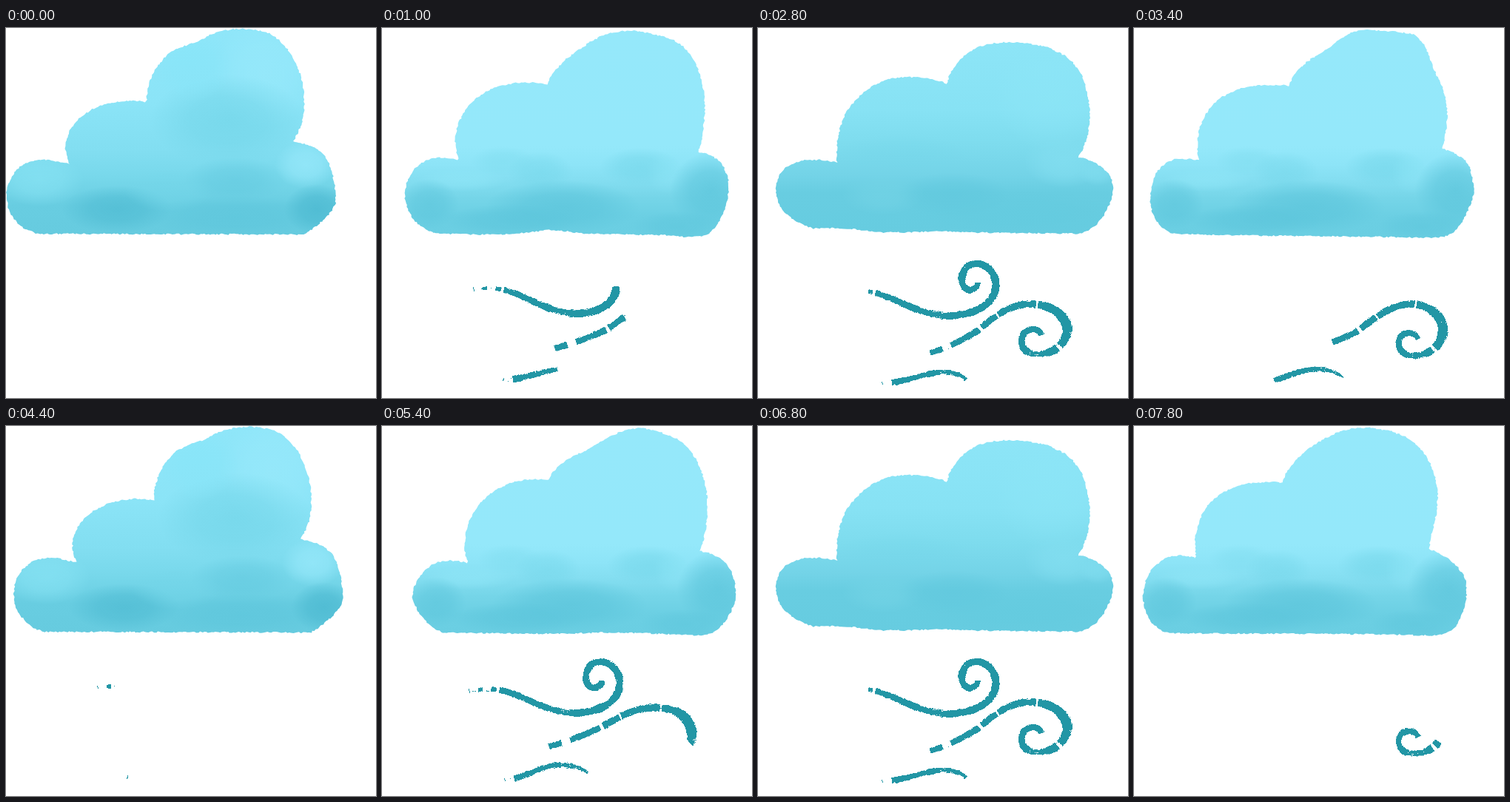
An HTML page with a canvas that plays this animation: 500x500 px, repeating every 8010 ms.

```html
<!DOCTYPE html>
<html lang="en">
<head>
<meta charset="utf-8">
<title>Windy cloud</title>
<style>
  html, body { margin: 0; width: 100%; height: 100%; overflow: hidden; background: #fff; }
  canvas { display: block; width: 100vw; height: 100vh; }
</style>
</head>
<body>
<canvas id="stage" width="500" height="500"></canvas>
<script>
const LOOP = 8010, STEP = 200, CYCLE = 20;
const ctx = document.getElementById('stage').getContext('2d');

function seeded(seed) {
  let s = seed * 2654435761 >>> 0;
  return () => {
    s = s + 0x6D2B79F5 >>> 0;
    let t = Math.imul(s ^ s >>> 15, 1 | s);
    t = t + Math.imul(t ^ t >>> 7, 61 | t) ^ t;
    return ((t ^ t >>> 14) >>> 0) / 4294967296;
  };
}

// Points along an SVG path, evenly spaced
function sample(d, gap) {
  const path = document.createElementNS('http://www.w3.org/2000/svg', 'path');
  path.setAttribute('d', d);
  const len = path.getTotalLength(), pts = [];
  for (let s = 0; s <= len; s += gap) {
    const p = path.getPointAtLength(s);
    pts.push([p.x, p.y]);
  }
  return pts;
}

// The cloud drifts right for half a cycle, then back
const drift = k => 4.8 * Math.min(k, CYCLE - k);

// Watercolour washes: vertical stops, then soft spots [x, y, rx, ry, rgb, alpha]
const LIGHT = '152,233,251', MID = '116,214,233', DARK = '92,197,219', DEEP = '80,188,211';
const washes = {
  tall: {
    stops: [[0, '#8fe6f9'], [100, '#8be4f7'], [165, '#82def1'], [200, '#78d8eb'], [240, '#68cde1'], [280, '#66cbdf']],
    spots: [
      [350, 60, 70, 75, LIGHT, .7], [300, 125, 105, 62, MID, .75], [250, 50, 55, 50, '136,229,248', .8],
      [405, 185, 42, 32, LIGHT, .75], [45, 205, 60, 36, '134,226,243', .7], [150, 245, 75, 32, DEEP, .75],
      [310, 205, 70, 30, DARK, .45], [310, 255, 120, 28, DARK, .6], [420, 245, 44, 34, DEEP, .95],
      [220, 220, 60, 28, MID, .5]
    ]
  },
  pale: {
    stops: [[0, '#95e8fa'], [160, '#94e8fa'], [185, '#8de4f7'], [205, '#84def1'], [230, '#75d5e8'], [255, '#6bcfe3'], [285, '#6acee2']],
    spots: [
      [140, 180, 45, 20, '125,219,237', .45], [190, 195, 45, 28, MID, .5], [325, 188, 55, 26, MID, .6],
      [85, 205, 60, 16, '143,230,247', .6], [220, 242, 105, 36, DARK, .75], [150, 260, 90, 22, DARK, .65],
      [40, 238, 40, 34, DARK, .6], [362, 195, 28, 30, '140,229,246', .4],
      [420, 220, 55, 52, DARK, .75], [375, 268, 60, 20, DARK, .5]
    ]
  },
  even: {
    stops: [[15, '#8de5f7'], [110, '#87e2f4'], [155, '#7edcee'], [200, '#73d3e7'], [222, '#68cde1'], [280, '#66cce0']],
    spots: [
      [365, 90, 75, 75, '141,230,247', .5], [385, 180, 55, 36, '130,222,240', .8], [165, 172, 90, 28, MID, .35],
      [140, 225, 55, 28, '116,212,230', .6], [235, 225, 75, 30, DARK, .4], [320, 250, 150, 30, '98,202,222', .5],
      [430, 195, 26, 18, '128,221,239', .7]
    ]
  }
};

// Each drawing: wash, the step it was posed at, outline
const clouds = [
  ['tall', 0, 'M42 278C18 272 0 252 1 225C2 198 22 178 50 178C64 179 74 182 86 184C76 166 80 144 92 130C112 104 152 94 190 100C190 72 204 42 232 27C248 22 258 20 274 10C296 0 326 -2 355 7C384 22 404 60 403 105C403 125 396 140 388 153C412 158 432 164 439 190C444 206 446 222 445 238C436 256 420 268 403 279Z'],
  ['pale', 5, 'M70 277C46 268 31 250 31 225C32 198 50 176 76 175C86 175 94 176 104 178C95 158 98 130 115 108C136 80 176 68 223 76C232 52 262 30 290 14C320 0 345 2 372 10C398 15 410 25 420 42C440 75 440 120 428 168C448 170 463 182 468 205C470 230 462 258 444 276C430 285 412 283 385 280C330 279 290 279 265 277C245 274 230 272 215 274C180 279 130 281 70 277Z'],
  ['pale', 7, 'M82 279C62 272 42 246 41 229C46 200 68 180 92 182C102 182 108 183 116 185C107 160 113 128 130 108C152 80 185 68 226 73C230 55 250 45 275 33C300 20 320 3 347 3C368 4 376 8 382 11C400 16 414 26 424 45C444 80 444 125 430 169C452 173 468 182 475 204C480 222 478 240 470 254C460 272 450 281 430 283C390 282 350 279 300 279C230 282 150 280 82 279Z'],
  ['even', 10, 'M100 274C70 270 44 252 43 229C44 205 70 185 115 182C124 181 130 182 137 185C128 165 128 140 140 115C160 80 185 65 220 66C240 67 258 70 273 77C278 50 290 30 312 23C345 17 380 18 410 27C440 38 462 72 468 105C470 135 464 160 454 178C475 182 492 195 498 215C500 240 485 262 448 278C400 279 300 279 200 277C160 276 130 276 100 274Z'],
  ['even', 14, 'M75 271C45 262 25 245 24 217C26 192 44 178 78 178C90 178 98 180 107 182C104 150 112 115 135 95C160 68 190 64 220 67C234 68 244 71 255 75C262 48 285 26 315 21C345 17 380 20 405 32C425 42 440 62 443 80C452 115 450 150 432 175C455 178 478 192 480 215C478 240 465 268 436 278C370 277 310 277 245 275C200 276 165 277 150 275C130 270 105 270 75 271Z'],
  ['pale', 17, 'M52 278C34 270 23 256 22 232C22 205 32 182 58 177C70 176 78 178 88 178C82 155 87 130 103 108C125 80 165 74 210 78C216 56 236 43 262 28C290 4 302 2 325 3C345 4 368 6 379 9C396 20 400 45 412 70C428 100 424 135 417 163C438 170 452 178 455 194C460 215 460 222 456 235C446 258 440 275 420 282C400 285 360 282 300 282C200 281 120 280 52 278Z'],
  ['pale', 19, 'M50 280C28 278 13 258 12 228C14 200 32 176 60 175C68 175 76 177 84 178C80 155 84 130 98 110C120 80 155 74 200 76C208 52 232 30 260 16C285 2 305 0 330 4C360 8 385 20 400 50C414 78 412 110 404 138C401 150 400 158 399 166C420 174 440 188 448 208C452 228 447 250 438 265C430 280 420 284 395 283C300 280 150 281 50 280Z']
].map(([wash, pose, d]) => ({ wash: washes[wash], pose, pts: sample(d, 2.5) }));

// First step of each drawing within a cycle
const cloudFrom = [0, 5, 7, 10, 13, 15, 18];

function drawCloud(k) {
  const i = cloudFrom.filter(from => from <= k).length - 1;
  const { wash, pose, pts } = clouds[i];
  const rnd = seeded(k + 11), shift = drift(k) - drift(pose);
  ctx.save();
  ctx.beginPath();
  for (const [x, y] of pts) ctx.lineTo(x + shift + rnd() * 2 - 1, y + rnd() * 2 - 1);
  ctx.closePath();
  ctx.clip();
  const base = ctx.createLinearGradient(0, 0, 0, 290);
  for (const [y, color] of wash.stops) base.addColorStop(y / 290, color);
  ctx.fillStyle = base;
  ctx.fillRect(0, 0, 500, 300);
  ctx.translate(drift(k), 0);
  for (const [x, y, rx, ry, rgb, alpha] of wash.spots) {
    ctx.save();
    ctx.translate(x, y);
    ctx.scale(rx, ry);
    const g = ctx.createRadialGradient(0, 0, 0, 0, 0, 1);
    g.addColorStop(0, `rgba(${rgb},${alpha})`);
    g.addColorStop(.5, `rgba(${rgb},${alpha * .75})`);
    g.addColorStop(1, `rgba(${rgb},0)`);
    ctx.fillStyle = g;
    ctx.fillRect(-1, -1, 2, 2);
    ctx.restore();
  }
  ctx.restore();
}

// Gusts: paths by first step, brush width along the line, gaps in px,
// dryness along the line, times (ms) of drawing in and wiping out
const gusts = [
  {
    paths: [
      [0, 'M124 353C142 351 156 351 172 356C195 362 222 384 262 386C290 386 312 374 316 355C318 325 292 315 281 322C270 334 276 352 286 354C292 353 296 349 297 344'],
      [7, 'M118 358C136 356 150 354 165 358C195 366 220 386 260 388C305 386 324 366 321 342C316 320 296 314 283 322C270 336 276 354 286 354C294 353 297 349 297 344'],
      [8, 'M118 358C136 355 146 354 160 361C190 369 215 384 258 386C300 383 322 362 316 340C311 318 288 315 277 323C270 334 274 352 286 351C291 351 294 348 295 344'],
      [13, 'M118 358C136 356 150 354 165 360C195 369 220 389 260 389C305 386 324 366 321 342C316 320 296 314 283 322C270 336 276 354 286 354C294 353 297 349 297 344']
    ],
    width: u => u < .12 ? 5 : 6 + 3.5 * Math.sin(Math.PI * Math.min(1, u * .85)),
    gaps: [[0, 12], [18, 30], [37, 41]],
    dry: u => u > .3 && u < .42 ? .5 : 0,
    draw: [330, 1330], wipe: [2740, 3390]
  },
  {
    paths: [
      [0, 'M234 433C258 426 278 419 296 411C308 406 318 397 327 391C350 378 360 379 375 380C405 383 420 398 419 424C412 432 395 438 375 438C356 436 352 420 360 409C368 402 380 402 383 412'],
      [7, 'M226 433C250 426 275 418 300 405C325 390 350 378 375 381C405 383 420 398 419 424C412 432 395 438 375 438C356 436 352 420 360 409C368 402 380 402 383 412'],
      [8, 'M233 438C255 432 275 420 297 406C318 388 340 370 368 370C400 370 420 390 418 408C412 430 395 438 375 438C356 436 352 420 360 409C368 402 380 402 383 412'],
      [13, 'M233 439C255 433 275 422 297 409C318 391 340 373 368 373C400 373 420 393 418 411C412 433 395 441 375 441C356 439 352 423 360 412C368 405 380 405 383 415'],
      [15, 'M235 437C255 429 275 423 298 412C322 396 345 372 378 373C402 375 421 393 417 414C412 434 395 443 376 443C358 442 354 426 361 416C369 410 380 411 384 420']
    ],
    width: u => 7.5 + 4 * Math.exp(-(((u - .62) / .1) ** 2)) + 1.5 * Math.sin(Math.PI * u),
    gaps: [[17, 30], [73, 78], [103, 106], [160, 163], [243, 248]],
    dry: u => u > .76 && u < .83 ? .6 : 0,
    draw: [660, 1750], wipe: [3330, 4010]
  },
  {
    paths: [
      [0, 'M164 475C185 476 205 467 238 461C260 458 272 464 280 470'],
      [7, 'M166 478C190 478 215 458 240 458C258 458 270 462 278 469'],
      [8, 'M167 478C190 482 215 472 240 471C262 471 272 476 281 479'],
      [13, 'M168 480C195 480 225 466 250 465C268 465 276 470 281 475'],
      [15, 'M168 481C195 478 220 462 245 461C266 461 276 467 283 472']
    ],
    width: u => u < .1 ? 5 : 8.5 - 3 * u,
    gaps: [[0, 13]],
    dry: u => u > .68 ? .7 : .15,
    draw: [340, 1390], wipe: [3310, 3800]
  }
];
for (const g of gusts) g.paths = g.paths.map(([from, d]) => [from, sample(d, .7)]);

const ramp = (t, [a, b]) => Math.max(0, Math.min(1, (t - a) / (b - a)));

// Dry brush: each bristle carries its own slowly changing load of paint
function drawGust(g, k, seed) {
  const t = k * STEP, head = ramp(t, g.draw), tail = ramp(t, g.wipe);
  if (head <= tail) return;
  const pts = g.paths.filter(([from]) => from <= k).pop()[1];
  const rnd = seeded(seed * 100 + k), n = pts.length - 1;
  const bristles = Array(25).fill(0);
  let rough = 0;
  ctx.fillStyle = '#2296a5';
  for (let i = 0; i <= n; i++) {
    const u = i / n, s = i * .7;
    const [x, y] = pts[i];
    const p = pts[Math.max(0, i - 1)], q = pts[Math.min(n, i + 1)];
    const len = Math.hypot(q[0] - p[0], q[1] - p[1]) || 1;
    const nx = (p[1] - q[1]) / len, ny = (q[0] - p[0]) / len;
    rough = rough * .85 + (rnd() - .5) * .6;
    const half = g.width(u) / 2 + rough;
    const inGap = g.gaps.some(([a, b]) => s > a && s < b);
    bristles.forEach((load, j) => {
      bristles[j] = load = load * .75 + rnd() - .5;
      const v = (j - 12) * .6;
      if (Math.abs(v) > half || u < tail || u > head) return;
      const edge = half - Math.abs(v) < 1;
      const need = inGap ? .95 : g.dry(u) - (edge ? .4 : 1.1);
      if (load > need) ctx.fillRect(Math.floor(x + nx * v), Math.floor(y + ny * v), 1, 1);
    });
  }
}

let shown = -1;
function render(now) {
  const step = Math.min(39, Math.floor(now % LOOP / STEP));
  const k = step % CYCLE;
  if (k !== shown) {
    shown = k;
    ctx.fillStyle = '#fff';
    ctx.fillRect(0, 0, 500, 500);
    drawCloud(k);
    gusts.forEach((g, i) => drawGust(g, k, i + 1));
  }
}

const start = performance.now();
function tick() {
  render(performance.now() - start);
  requestAnimationFrame(tick);
}
tick();
</script>
</body>
</html>
```
